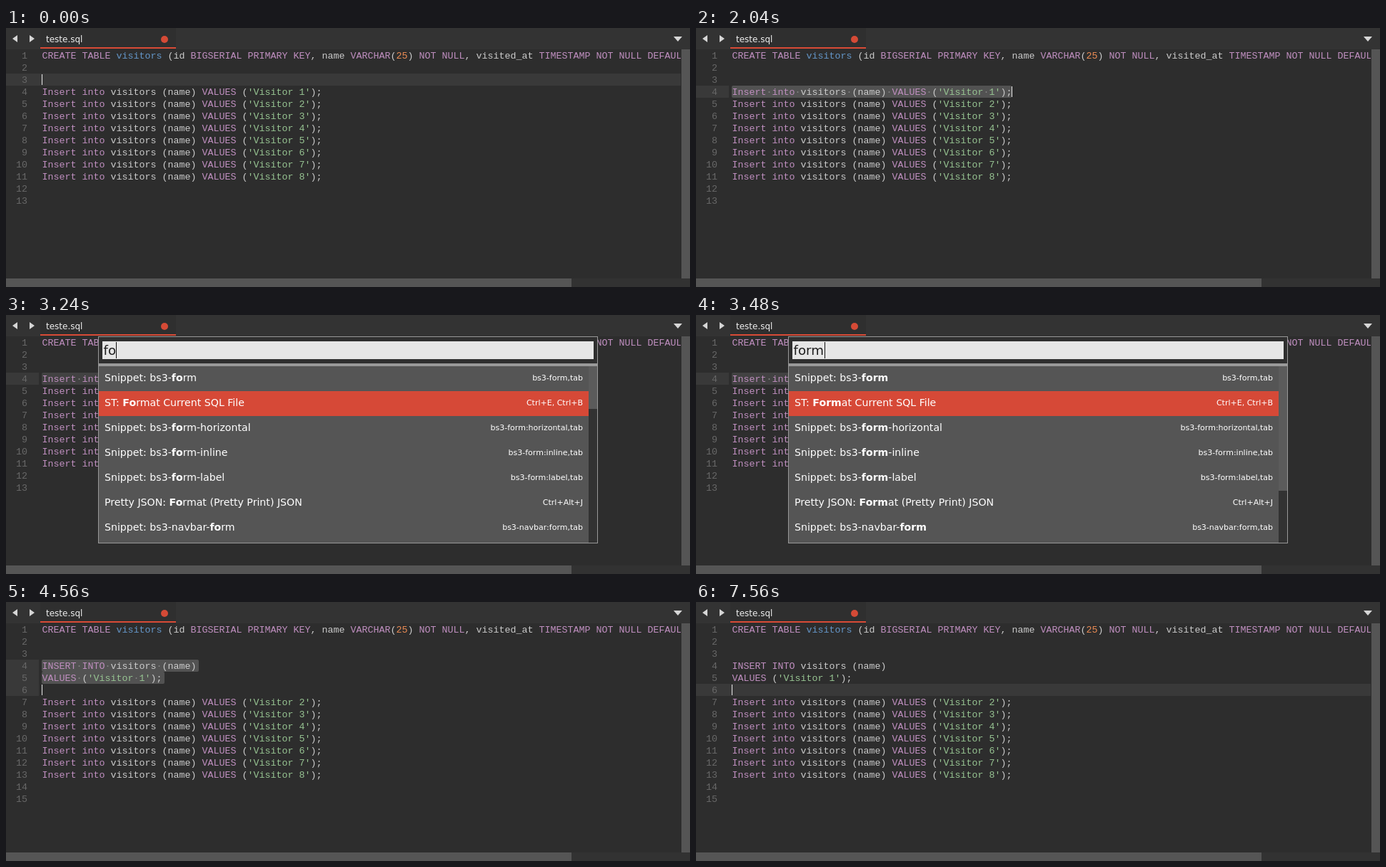
These frames come from a looping animation (958 by 364 pixels, 8000 ms). An HTML page:

```html
<!DOCTYPE html>
<html lang="en">
<head>
<meta charset="utf-8">
<title>Formatting SQL in an editor</title>
<style>
  html, body { margin: 0; width: 100%; height: 100%; overflow: hidden; background: #2d2d2d; }
  svg { display: block; width: 958px; height: 364px; }
  text { white-space: pre; font-family: "DejaVu Sans", sans-serif; }
  .code { font: 13.333px "Liberation Mono", monospace; fill: #cbcbcb; }
  .num { fill: #686868; text-anchor: end; }
  .kw { fill: #c08fc0; }
  .str { fill: #97c492; }
  .lit { fill: #ee8d55; }
  .fn { fill: #6496c8; }
  .dots { fill: #858585; }
  .tab { font-size: 12px; fill: #f0f0f0; }
  .input { font-size: 18.2px; fill: #1e1e1e; }
  .item { font-size: 14.15px; fill: #fff; }
  .item .b { font-weight: bold; }
  .keys { font-size: 11px; fill: #fff; text-anchor: end; }
</style>
</head>
<body>
<svg id="stage" viewBox="0 0 958 364">
  <defs><clipPath id="page"><rect y="30" width="945" height="322"/></clipPath></defs>
  <rect width="958" height="364" fill="#2d2d2d"/>
  <g id="editor" clip-path="url(#page)"></g>
  <rect width="958" height="30" fill="#333"/>
  <rect x="48" width="190" height="30" fill="#2f2f2f"/>
  <rect x="48" y="27" width="190" height="2" fill="#d94a36"/>
  <path d="M16 10v10l-7-5zM33 10v10l7-5zM935 12h12l-6 7z" fill="#d6d6d6"/>
  <text class="tab" x="56" y="20">teste.sql</text>
  <circle cx="222" cy="16" r="5" fill="#d54a36"/>
  <rect x="946" y="30" width="12" height="322" fill="#555"/>
  <rect y="352" width="958" height="12" fill="#323232"/>
  <rect y="352" width="792" height="12" fill="#555"/>
  <g id="palette"></g>
</svg>
<script>
const LOOP = 8000, LEFT = 50.5, CHAR = 8, LINE = 17, ROW = 35;
const rect = (x, y, w, h, fill, more = '') =>
  `<rect x="${x}" y="${y}" width="${w}" height="${h}" fill="${fill}" ${more}/>`;
const text = (cls, x, y, body) => `<text class="${cls}" x="${x}" y="${y}">${body}</text>`;
const lineTop = n => 30 + LINE * (n - 1);

const create = 'CREATE TABLE visitors (id BIGSERIAL PRIMARY KEY, name VARCHAR(25) NOT NULL, ' +
  'visited_at TIMESTAMP NOT NULL DEFAULT';
const inserts = from => Array.from({ length: 9 - from },
  (_, i) => `Insert into visitors (name) VALUES ('Visitor ${from + i}');`);
const rawDoc = [create, '', '', ...inserts(1), '', ''];
const doneDoc = [create, '', '', 'INSERT INTO visitors (name)', "VALUES ('Visitor 1');", '',
  ...inserts(2), '', ''];

const token = /('[^']*')|((?<=TABLE )\w+)|\b(create|table|bigserial|primary|key|varchar|not|null|timestamp|default|insert|into|values)\b|\b(\d+)\b/gi;
const colour = line => line.replace(token, (all, str, fn, kw) =>
  `<tspan class="${str ? 'str' : fn ? 'fn' : kw ? 'kw' : 'lit'}">${all}</tspan>`);

function drawEditor({ doc, line, caret, gutter = [line], selected = [], column = 0, dim }) {
  let out = '';
  for (const n of gutter) out += rect(0, lineTop(n), selected.length ? 46 : 945, LINE, '#393939');
  for (const n of selected) {
    const tail = selected.length > 1 ? 4 : 0;
    out += rect(50, lineTop(n), doc[n - 1].length * CHAR + tail, LINE, dim ? '#424242' : '#525252', 'rx="2"');
  }
  doc.forEach((body, i) => {
    const y = lineTop(i + 1) + 13;
    out += text('code num', 30, y, i + 1) + text('code', LEFT, y, colour(body));
    if (selected.includes(i + 1))
      out += text('code dots', LEFT, y, body.replace(/\S/g, ' ').replace(/ /g, (s, at) => body[at] === ' ' ? '·' : ' '));
  });
  if (caret) out += rect(50 + column * CHAR, lineTop(line) + 1, 1, 15, '#e8e8e8');
  return out;
}

// Items are "label|shortcut"; asterisks mark the matched letters.
const emmet = ['De*Number by 1|Ctrl+Down', 'De*Number by 10|Alt+Shift+Down', 'In*Number by 1|Ctrl+Up',
  'In*Number by 10|Alt+Shift+Up', 'De*Number by 0.1|Alt+Down']
  .map(s => 'Em*me*t: ' + s.replace('*Nu', 'crement *Nu*'));
const menuItems = ['View: Toggle *Menu*', 'Preferences: *M*arkdown*E*diti*n*g Settings – *U*…r', ...emmet];
const formItems = q => {
  const rest = 'form'.slice(q.length), hit = `*${q}*${rest}`;
  const cap = hit.replace('f', 'F');
  const snippet = (a, z, keys) => `Snippet: bs3-${a}${hit}${z}|bs3-${keys},tab`;
  return [snippet('', '', 'form'), `ST: ${cap}at Current SQL File|Ctrl+E, Ctrl+B`,
    snippet('', '-horizontal', 'form:horizontal'), snippet('', '-inline', 'form:inline'),
    snippet('', '-label', 'form:label'), `Pretty JSON: ${cap}at (Pretty Print) JSON|Ctrl+Alt+J`,
    snippet('navbar-', '', 'navbar:form')];
};
const formatItems = q => {
  const cap = `*F${q.slice(1)}*${'format'.slice(q.length)}`;
  return [`ST: ${cap} Current SQL File|Ctrl+E, Ctrl+B`, `Pretty JSON: ${cap} (Pretty Print) JSON|Ctrl+Alt+J`,
    'Snippet: bs3-form-horizontal|bs3-form:horizontal,tab'];
};
const formaItems = [...formatItems('forma'), 'Snippet: bs3-form-label|bs3-form:label,tab'];

function drawPalette({ query, items, active = 0, thumb, marked }) {
  const bottom = thumb ? 320 : 72 + ROW * items.length;
  const right = thumb ? 816 : 828;
  const width = { menu: 52, f: 6, fo: 17, for: 25, form: 43, forma: 54, format: 61 }[query];
  let out = rect(129.5, 30.5, 699, bottom - 30, '#2f2f2f', 'stroke="#999"') +
    rect(135, 37, 688, 25, '#e6e6e6') +
    rect(130, 68, 698, 4, '#999') +
    rect(130, 72, 698, bottom - 72, '#555');
  if (marked) out += rect(137, 38, width, 23, '#9dbccb');
  out += text('input', 136.5, 56, query) + rect(137 + width, 38, 1, 23, '#111');
  if (thumb) out += rect(816, 72, 12, 248, '#323232') + rect(816, 72, 12, thumb, '#5b5b5b');
  items.forEach((item, i) => {
    const [label, keys = ''] = item.split('|'), y = 72 + ROW * i;
    if (i === active) out += rect(130, y, right - 130, ROW, '#d64937');
    out += text('item', 138, y + 21, label.replace(/\*(.*?)\*/g, '<tspan class="b">$1</tspan>')) +
      text('keys', right - 8, y + 20, keys);
  });
  return out;
}

const raw = (line, caret) => ({ doc: rawDoc, line, caret });
const done = (line, caret) => ({ doc: doneDoc, line, caret });
const picked = { doc: rawDoc, line: 4, caret: true, selected: [4], column: 49 };
const formatted = caret => ({ ...done(6, caret), gutter: [4, 5, 6], selected: [4, 5] });
const search = (query, items, more) => [{ ...picked, dim: true }, { query, items, ...more }];

const steps = [
  [0, raw(3, true)],
  [840, raw(3, false)],
  [1200, raw(3, true)],
  [1560, raw(4, true)],
  [2040, picked],
  [2760, ...search('menu', menuItems, { thumb: 73, marked: true })],
  [3120, ...search('f', formItems('f'), { active: 1, thumb: 20 })],
  [3240, ...search('fo', formItems('fo'), { active: 1, thumb: 60 })],
  [3360, ...search('for', formItems('for'), { active: 1, thumb: 120 })],
  [3480, ...search('form', formItems('form'), { active: 1, thumb: 175 })],
  [3600, ...search('forma', formaItems)],
  [3840, ...search('format', formatItems('format'))],
  [4560, formatted(true)],
  [5400, formatted(false)],
  [5640, done(7, true)],
  [6360, done(7, false)],
  [6840, done(7, true)],
  [7560, done(6, true)],
];

const editor = document.getElementById('editor'), palette = document.getElementById('palette');
const start = performance.now();
let shown;
function tick() {
  const t = (performance.now() - start) % LOOP;
  const step = steps.findLast(s => s[0] <= t);
  if (step !== shown) {
    shown = step;
    editor.innerHTML = drawEditor(step[1]);
    palette.innerHTML = step[2] ? drawPalette(step[2]) : '';
  }
  requestAnimationFrame(tick);
}
tick();
</script>
</body>
</html>
```
